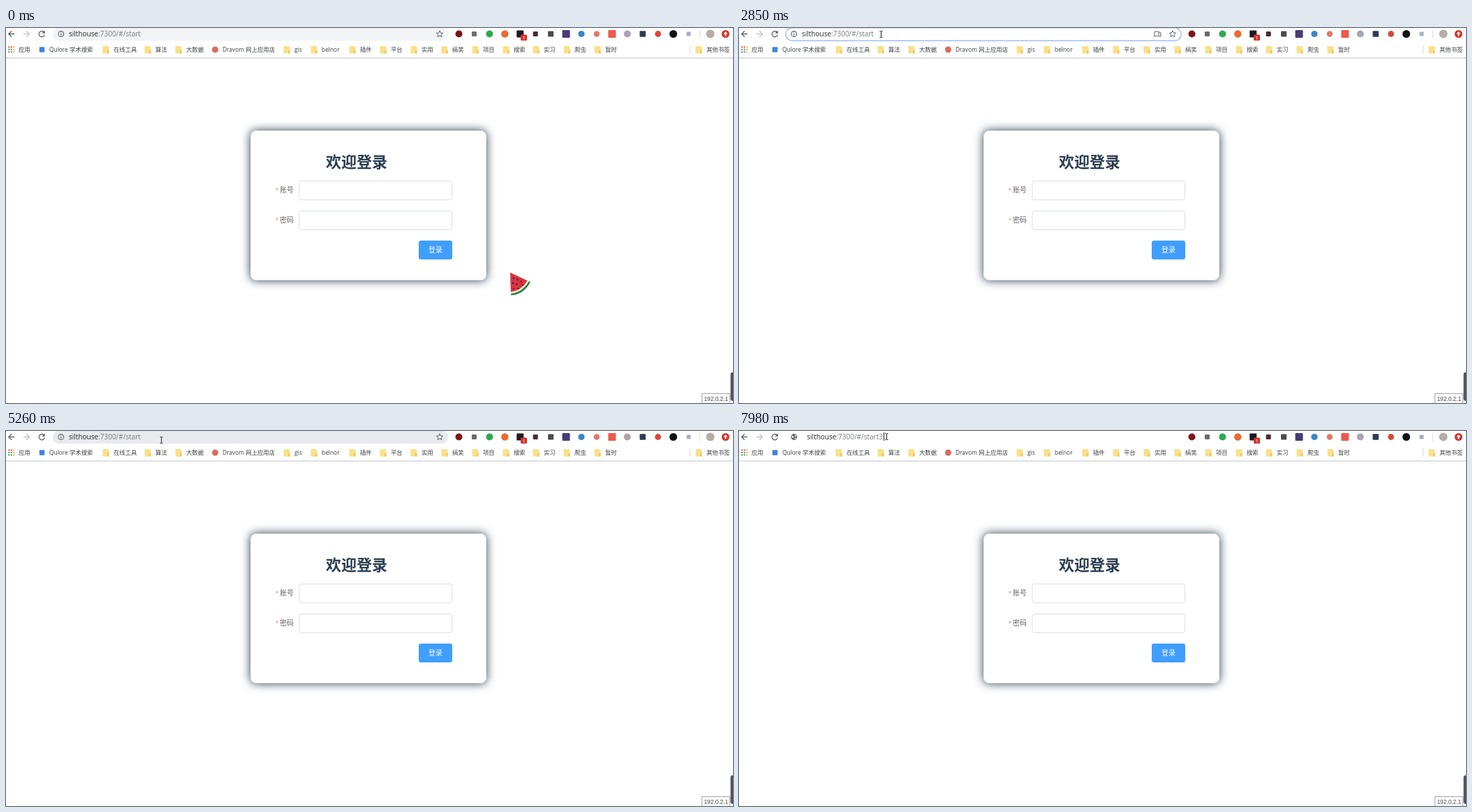
Recreate the animation shown at these times as an HTML page. Size 1041 px wide and 538 px high, loop 8000 ms.

```html
<!DOCTYPE html>
<html lang="zh-CN">
<head>
<meta charset="utf-8">
<title>欢迎登录</title>
<style>
html, body { margin: 0; width: 1041px; height: 538px; overflow: hidden; background: #fff; }
#card {
  position: absolute; left: 350px; top: 147px; width: 336px; height: 213px;
  border: 1px solid #e6e8eb; border-radius: 8px; background: #fff;
  box-shadow: 0 0 14px #2c3e50;
}
svg { position: absolute; left: 0; top: 0; font-family: "Open Sans", "Noto Sans CJK SC", "Noto Sans CJK", sans-serif; }
text { white-space: pre; }
.line { fill: none; stroke: #5f6368; stroke-width: 1.3; }
.mark { font-size: 8.4px; fill: #3c4043; }
.url { font-size: 10px; }
.field { fill: #fff; stroke: #dcdfe6; }
.label { font-size: 10px; fill: #606266; }
.star { font-size: 9px; fill: #ee8f76; }
</style>
</head>
<body>
<div id="card"></div>
<svg width="1041" height="538" viewBox="0 0 1041 538">
  <defs>
    <clipPath id="selClip"><rect id="selArea" y="1" height="15"/></clipPath>
  </defs>

  <g id="page">
    <text x="458" y="200" font-size="22" font-weight="700" fill="#2c3e50">欢迎登录</text>
    <text class="star" x="385.5" y="236">*</text>
    <text class="label" x="392" y="236">账号</text>
    <text class="star" x="385.5" y="279">*</text>
    <text class="label" x="392" y="279">密码</text>
    <rect class="field" x="420" y="219.5" width="218.5" height="27" rx="3"/>
    <rect class="field" x="420" y="262.5" width="218.5" height="27" rx="3"/>
    <rect x="591" y="305" width="48" height="27" rx="3" fill="#409eff"/>
    <text x="605" y="321.5" font-size="10" fill="#fff">登录</text>
    <rect x="996.5" y="524.5" width="40" height="14" fill="#f8f8f8" stroke="#a9a9a9"/>
    <text x="999.5" y="535" font-size="8.3" fill="#555" style="font-family:'Liberation Sans',sans-serif">192.0.2.1</text>
  </g>

  <rect x="1037.5" y="494" width="8" height="41" rx="3" fill="#4d525b"/>

  <g id="status">
    <rect x="-5" y="523.5" width="347" height="20" rx="3" fill="#fff" stroke="#d9dbde"/>
    <text x="-6" y="534.3" font-size="8" fill="#5f6368">正在连接...</text>
  </g>

  <rect y="42.5" width="1041" height="1" fill="#bfc1c4"/>
  <path class="line" d="M12 8.5H4M8 4.3L3.8 8.5L8 12.7"/>
  <path class="line" d="M25 8.5H33M29.4 4.3L33.6 8.5L29.4 12.7" style="stroke:#c4c6c9"/>
  <g id="reload">
    <path class="line" d="M54.3 5.8A4.1 4.1 0 1 0 55.3 9.6"/>
    <path d="M55.8 3.4V7.8H51.4Z" fill="#5f6368"/>
  </g>
  <path id="stop" class="line" d="M47.3 4.6L55 12.4M55 4.6L47.3 12.4"/>

  <rect id="pill" x="66.7" y="-.3" width="566.6" height="18.6" rx="9.3" stroke-width="1.5"/>
  <g id="info">
    <circle class="line" cx="78.8" cy="8.5" r="3.9" style="stroke-width:1.1"/>
    <path class="line" d="M78.8 7.9V10.9M78.8 5.8V7" style="stroke-width:1.1"/>
  </g>
  <g id="globe">
    <circle cx="78.8" cy="8.5" r="4.4" fill="#5f6368"/>
    <path d="M76 6.2L78.5 8.2L77.2 10.2L75.4 8.6ZM79.5 5L82 7L80.4 8.4ZM79.6 9.4L82 9.8L79.8 12Z" fill="#fff"/>
  </g>
  <g id="devices" class="line" style="stroke-width:1">
    <path d="M602 5.2H595V10.8M593.5 11.6H599.5"/>
    <rect x="600.8" y="6.8" width="3" height="5"/>
  </g>
  <path id="fav" class="line" style="stroke-width:1"/>

  <g id="address">
    <text class="url" x="90" y="12.2" fill="#777b80"><tspan fill="#2b2d30">silthouse</tspan>:7300/#/start<tspan id="typed"></tspan></text>
    <g clip-path="url(#selClip)">
      <rect x="90" y="1" width="104.5" height="15" fill="#0078d7"/>
      <text class="url" x="90" y="12.2" fill="#fff">silthouse:7300/#/start</text>
    </g>
  </g>
  <rect id="caret" y="2" width="1" height="12" fill="#222"/>

  <g id="bar"></g>
  <g id="badge">
    <rect x="737" y="9.5" width="9" height="8.5" rx="1.5" fill="#d8302f"/>
    <text x="739.6" y="16.8" font-size="7.5" fill="#fff">1</text>
  </g>

  <g id="melon">
    <path d="M0 0L1.2 32.5Q20 31 28.8 13.5Z" fill="#2f7d3b"/>
    <path d="M0 0L1.1 30.3Q18 28 26.8 12.6Z" fill="#f3efd0"/>
    <path d="M0 0L1 27.8Q16 25.5 24.6 11.5Z" fill="#d93443"/>
    <path d="M5 7v2M4 14v2M10 9l1 1.6M9 16l.6 1.8M15 12l1.2 1.2M5 22v1.8M11 22l.8 1.6M17 17l1.2 1.4" stroke="#2a1416" stroke-width="1.7"/>
  </g>
  <path id="arrow" d="M0 0V11L2.6 8.7L4.3 12.4L6 11.6L4.3 8H7.6Z" fill="#fff" stroke="#222" stroke-width=".8"/>
  <path id="beam" d="M-2 -4.5H-.6L0 -4L.6 -4.5H2M0 -4V4M-2 4.5H-.6L0 4L.6 4.5H2" fill="none" stroke="#222"/>
</svg>
<script>
const $ = id => document.getElementById(id);
const show = (id, on) => { $(id).style.display = on ? '' : 'none'; };
const dot = (x, y, r, c) => `<circle cx="${x}" cy="${y}" r="${r}" fill="${c}"/>`;
const box = (x, y, s, c) => `<rect x="${x - s / 2}" y="${y - s / 2}" width="${s}" height="${s}" rx="1" fill="${c}"/>`;
const mark = (x, s) => `<text class="mark" x="${x}" y="34">${s}</text>`;
const folder = (x, s) =>
  `<path d="M${x + .5} 26h7.5l1.5 1.5v9h-9z" fill="#fbe08a"/><path d="M${x + 7} 32h2.5v4.5h-2.5z" fill="#edc75a"/>` + mark(x + 16, s);

// bookmarks bar and extension buttons
function buildBar() {
  let s = '';
  const dots = ['#e5493a', '#e5493a', '#f0b429', '#3f9b52', '#4285d6', '#f0b429', '#3f9b52', '#3f9b52', '#f0b429'];
  dots.forEach((c, i) => { s += box(4.3 + i % 3 * 3.5, 27.3 + Math.floor(i / 3) * 3.5, 2.2, c); });
  s += mark(18, '应用') + box(51.5, 31, 7.5, '#4283dd') + mark(62, 'Qulore 学术搜索');
  s += dot(299.5, 31, 4.5, '#dc6a60') + mark(310, 'Dravom 网上应用店');
  [[138, '在线工具'], [198, '算法'], [242, '大数据'], [397, 'gis'], [436, 'belnor'], [491, '插件'],
   [535, '平台'], [579, '实用'], [623, '搞笑'], [667, '项目'], [711, '搜索'], [754, '实习'],
   [798, '爬虫'], [842, '暂时'], [987, '其他书签']].forEach(f => { s += folder(...f); });
  s += '<path d="M979.5 25V37M993.5 3V14" stroke="#dadce0"/>';
  [[dot, 5, '#7a1519'], [box, 7, '#6b6b6b'], [dot, 5, '#2da94f'], [dot, 5.2, '#ea6a30'],
   [box, 10, '#1c1c1e'], [box, 7, '#4a2a35'], [box, 8, '#4b4b4b'], [box, 11, '#473b78'],
   [dot, 4.6, '#3b86c6'], [dot, 4.2, '#e2796a'], [box, 11, '#ee5a4b'], [dot, 5, '#aaa4b0'],
   [box, 8.5, '#2f3a50'], [dot, 4.4, '#dc4639'], [dot, 5.5, '#111'], [box, 6, '#a9aebc']]
    .forEach(([draw, size, c], i) => { s += draw(648.5 + i * 21.93, 8.5, size, c); });
  s += dot(1008.5, 8.5, 6, '#b3aea6') + dot(1030.3, 8.5, 5.5, '#d93025');
  s += '<path d="M1030.3 5L1027.3 8.5H1029.3V11.5H1031.3V8.5H1033.3Z" fill="#fff"/>';
  $('bar').innerHTML = s;
}

function starPath(cx, cy, r) {
  let d = '';
  for (let i = 0; i < 10; i++) {
    const a = i * Math.PI / 5, k = i % 2 ? r * .45 : r;
    d += (i ? 'L' : 'M') + (cx + k * Math.sin(a)) + ' ' + (cy - k * Math.cos(a));
  }
  return d + 'Z';
}

const LOOP = 8000;
const ALL = [90, 194.5], WORD = [171, 194.5], NONE = [90, 90];
// each entry changes some of the state from its time on
const events = [
  [0, { hover: 0, focus: 0, sel: NONE, caret: 0, load: 0, page: 1, status: 0, badge: 1, typed: 0 }],
  [1070, { hover: .5 }], [1160, { hover: 1 }],
  [1210, { focus: 1, caret: 1 }], [1470, { sel: ALL, caret: 0 }],
  [2300, { sel: NONE, caret: 1 }], [2850, { caret: 0 }],
  [3320, { focus: 0, load: 1 }],
  [3630, { status: 1, badge: 0 }], [3870, { badge: 1 }],
  [4040, { page: 0 }], [4560, { page: 1 }], [4720, { load: 0 }],
  [5120, { status: .65 }], [5190, { status: .3 }], [5260, { status: 0 }],
  [5490, { focus: 1, caret: 1 }], [5670, { sel: ALL, caret: 0 }],
  [5970, { sel: WORD }], [6350, { sel: ALL }],
  [6920, { sel: NONE, caret: 1 }], [7450, { caret: 0 }],
  [7980, { typed: 1, caret: 1 }]
];

// pointer: time, x, y
const path = [
  [143, 722, 351], [605, 330, 130], [759, 150, 52], [836, 93, 24], [990, 200, 11], [1067, 204, 9],
  [1837, 204, 9], [1914, 203, 9], [3600, 203, 9], [3830, 197.5, 4.5],
  [4480, 197.5, 4.5], [4880, 222, 12.5], [6600, 222, 12.5], [6680, 216, 9], [6800, 216, 9], [6990, 211, 7.5]
];
const STEP = 77;

function pointer(time) {
  const t = 220 + Math.floor((time - 220) / STEP) * STEP;
  const i = path.findIndex(p => p[0] > t);
  if (i === 0) return path[0].slice(1);
  if (i < 0) return path[path.length - 1].slice(1);
  const [t0, x0, y0] = path[i - 1], [t1, x1, y1] = path[i];
  const k = (t - t0) / (t1 - t0);
  return [x0 + (x1 - x0) * k, y0 + (y1 - y0) * k];
}

function render(t) {
  const s = {};
  for (const [at, change] of events) if (at <= t) Object.assign(s, change);

  show('page', s.page);
  show('card', s.page);
  $('status').style.opacity = s.status;
  show('badge', s.badge);
  show('reload', !s.load);
  show('stop', s.load);

  const mix = (a, b) => Math.round(a + (b - a) * s.hover);
  const grey = `rgb(${mix(241, 232)},${mix(243, 234)},${mix(244, 237)})`;
  $('pill').setAttribute('fill', s.focus ? '#fff' : grey);
  $('pill').setAttribute('stroke', s.typed ? '#fff' : s.focus ? '#a5bfee' : 'none');
  show('devices', s.focus && !s.typed);
  show('fav', !s.typed);
  show('info', !s.typed);
  show('globe', s.typed);

  $('typed').textContent = s.typed ? '3' : '';
  $('address').setAttribute('transform', `translate(${s.typed ? 7.3 : 0} 0)`);
  $('selArea').setAttribute('x', s.sel[0]);
  $('selArea').setAttribute('width', s.sel[1] - s.sel[0]);
  show('caret', s.focus && s.caret);
  $('caret').setAttribute('x', s.typed ? 207 : 194);

  const [x, y] = pointer(t);
  const kind = y > 43 ? 'melon' : y < 19 && x > 66 ? 'beam' : 'arrow';
  for (const id of ['melon', 'arrow', 'beam']) show(id, id === kind);
  $(kind).setAttribute('transform', `translate(${Math.round(x) + (kind === 'beam' ? .5 : 0)} ${Math.round(y)})`);
}

buildBar();
$('fav').setAttribute('d', starPath(621, 8.7, 4.9));
const start = performance.now();
function frame() {
  render((performance.now() - start) % LOOP);
  requestAnimationFrame(frame);
}
frame();
</script>
</body>
</html>
```
